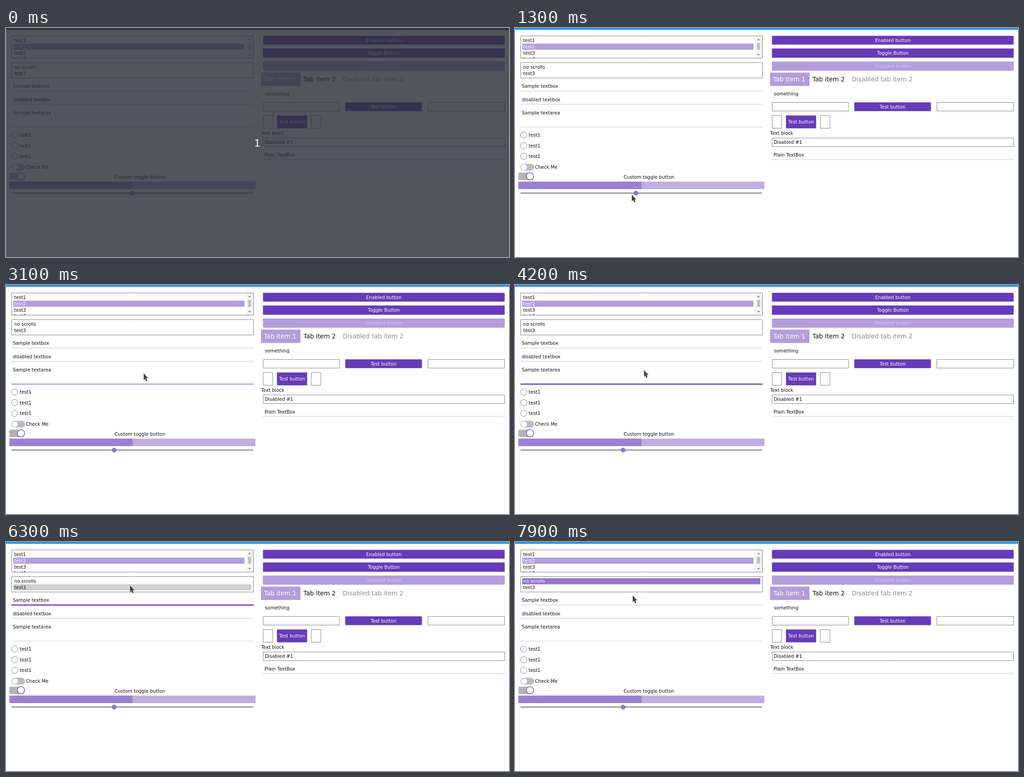
Write an HTML page with a canvas that moves like this. It is 1107x506 px and loops after 8 s.

```html
<!DOCTYPE html>
<html lang="en">
<head>
<meta charset="utf-8">
<title>Control gallery</title>
<style>
  html, body { margin: 0; width: 100%; height: 100%; overflow: hidden; background: #fff; }
  canvas { display: block; }
</style>
</head>
<body>
<canvas id="stage" width="1107" height="506"></canvas>
<script>
const ctx = document.getElementById('stage').getContext('2d');
const LOOP = 8000, STEP = 100;
const DEEP = '#673ab7', MID = '#9575cd', LIGHT = '#b39ddb', PALE = '#e6e4f2';
const GRAY = '#808080', INK = '#111';

// Pointer path: time, x, y
const path = [
  [200, 332, 477], [800, 282, 367], [1000, 282, 367], [1200, 266, 368],
  [1300, 257, 368], [1500, 238, 369], [1800, 238, 376], [2600, 297, 217],
  [2700, 299, 213], [3100, 303, 195], [3300, 303, 194], [3600, 288, 255],
  [3900, 285, 201], [4900, 283, 159], [5400, 281, 126], [5600, 281, 126],
  [6400, 272, 92], [7100, 268, 83], [7300, 268, 83], [7900, 259, 118]
];

function pointerAt(t) {
  if (t <= path[0][0]) return path[0].slice(1);
  const i = path.findIndex(p => p[0] >= t);
  if (i < 0) return path[path.length - 1].slice(1);
  const [t0, x0, y0] = path[i - 1], [t1, x1, y1] = path[i];
  const k = (t - t0) / (t1 - t0);
  return [x0 + (x1 - x0) * k, y0 + (y1 - y0) * k].map(Math.round);
}

function box(x, y, w, h, fill, radius = 0) {
  ctx.fillStyle = fill;
  ctx.beginPath();
  ctx.roundRect(x, y, w, h, radius);
  ctx.fill();
}

function frame(x, y, w, h, stroke = GRAY, radius = 0) {
  ctx.strokeStyle = stroke;
  ctx.lineWidth = 1;
  ctx.beginPath();
  ctx.roundRect(x + 0.5, y + 0.5, w - 1, h - 1, radius);
  ctx.stroke();
}

function circle(x, y, r, fill, stroke, width = 1) {
  ctx.beginPath();
  ctx.arc(x, y, r, 0, Math.PI * 2);
  ctx.fillStyle = fill;
  ctx.fill();
  if (!stroke) return;
  ctx.strokeStyle = stroke;
  ctx.lineWidth = width;
  ctx.stroke();
}

function polygon(points, fill) {
  ctx.fillStyle = fill;
  ctx.beginPath();
  points.forEach(([x, y]) => ctx.lineTo(x, y));
  ctx.fill();
}

function label(text, x, y, color = INK, size = 10.2, align = 'left') {
  ctx.font = `${size}px "DejaVu Sans", sans-serif`;
  ctx.textAlign = align;
  ctx.fillStyle = color;
  ctx.fillText(text, x, y);
}

function button(text, x, y, w, h, radius = 2, enabled = true) {
  box(x, y, w, h, enabled ? DEEP : LIGHT, radius);
  if (radius) frame(x, y, w, h, enabled ? '#8f76c4' : '#b9a8dc', radius);
  label(text, x + w / 2, y + h / 2 + 3.8, enabled ? '#fff' : '#d1c4e9', 10.2, 'center');
}

function field(text, baseline, lineY, hovered, focused) {
  label(text, 15, baseline);
  box(12, lineY, 533, 2.5, focused ? DEEP : hovered ? LIGHT : PALE);
}

function lists(hover, selected) {
  frame(12, 17, 533, 50);
  box(16, 34.5, 509, 13.5, LIGHT);
  ctx.save();
  ctx.beginPath();
  ctx.rect(13, 18, 531, 48.5);
  ctx.clip();
  for (let i = 0; i < 4; i++)
    label('test' + (i + 1), 18, 31.3 + i * 13.6, i === 1 ? '#fff' : INK);
  ctx.restore();
  box(528, 18, 16, 48, '#f5f5f5');
  box(532.5, 33, 7, 15, '#c2c2c2');
  polygon([[533, 27], [536, 23.5], [539, 27]], GRAY);
  polygon([[533, 57.5], [536, 61], [539, 57.5]], GRAY);

  frame(12, 76, 533, 35);
  ['no scrolls', 'test3'].forEach((text, i) => {
    const y = 80 + i * 13.6, chosen = selected && i === 0;
    if (chosen || hover(y, y + 13.5)) box(16, y, 524, 13.5, chosen ? MID : '#d0d0d0');
    label(text, 18, y + 10.3, chosen ? '#fff' : INK);
  });
}

function leftPanel(t) {
  const [, hoverY] = pointerAt(t - STEP);
  const hover = (top, bottom) => t > 1800 && hoverY >= top && hoverY < bottom;
  const areaFocus = t >= 3300 && t < 5600, boxFocus = t >= 5600 && t < 7300;

  lists(hover, t >= 7400);
  field('Sample textbox', 132.3, 138, hover(119, 142), boxFocus);
  field('disabled textbox', 161.6, 167.5, hover(148, 171), false);
  field('Sample textarea', 191, 217.7, hover(177, 221), areaFocus);
  if (areaFocus && (t - 3300) % 1000 < 500) box(98.5, 181.5, 1, 12, '#000');
  if (boxFocus && (t - 5600) % 1000 < 500) box(95, 122.5, 1, 12, '#000');

  for (let i = 0; i < 3; i++) {
    const y = 236.5 + i * 23.5;
    circle(19.2, y, 7, '#fff', hover(y - 8, y + 8) ? MID : GRAY);
    label('test1', 30, y + 3.7);
  }

  box(12, 300, 30, 15, '#bdbdbd', 7.5);
  circle(20, 307.5, 6.3, '#fff');
  label('Check Me', 44, 311);
  box(7.5, 319.5, 34, 16.5, '#b3b3b3', [3, 8, 8, 3]);
  circle(33, 327.6, 8, '#fff', DEEP, 1.2);
  label('Custom toggle button', 239, 332.6);

  box(7.5, 339.5, 541.5, 16.5, '#c0aee0');
  box(7.5, 339.5, 271, 16.5, '#9b80d0');
  box(12, 363, 532, 3.4, '#a9a9a9', 1);
  const dragX = pointerAt(Math.min(t, 1700) - STEP)[0];
  circle(t < 1000 ? 278 : Math.min(278, Math.max(238, dragX)), 364.7, 5.3, MID);
}

function rightPanel() {
  button('Enabled button', 565.5, 17, 532, 20);
  button('Toggle Button', 565.5, 45.3, 532, 20.4, 0);
  button('Disabled button', 565.5, 74, 532, 20.3, 2, false);

  box(561.3, 98.5, 86.7, 29.5, LIGHT);
  label('Tab item 1', 568, 118, '#fff', 13.6);
  label('Tab item 2', 654.6, 118, INK, 13.6);
  label('Disabled tab item 2', 741.3, 118, '#8c8c8c', 13.6);
  label('something', 569.7, 149.3);

  frame(565.5, 164, 169, 20);
  button('Test button', 746.5, 164, 169, 20);
  frame(928, 164, 170, 20);
  frame(565.5, 193, 22, 29);
  button('Test button', 596, 193, 67, 29);
  frame(671.5, 193, 22, 29);

  label('Text block', 561.5, 235.8);
  frame(565.5, 242.5, 532.5, 20);
  label('Disabled #1', 569.5, 256.2);
  label('Plain TextBox', 569, 283.8);
  box(565.5, 289.3, 532.5, 2.5, PALE);
}

function pointer(x, y) {
  const shape = [[0, 0], [0, 14.7], [3, 12.2], [5.2, 17.2], [7.8, 16], [6, 11.4], [9.5, 10.6]];
  polygon(shape.map(([dx, dy]) => [x + dx, y + dy]), '#474747');
}

function render(now) {
  const t = Math.floor(now % LOOP / STEP) * STEP;
  box(0, 0, 1107, 506, '#fff');
  leftPanel(t);
  rightPanel();
  if (t < 200) {
    box(0, 4, 1107, 502, 'rgba(45, 48, 57, 0.82)');
    label('1', 553, 262, '#fff', 22, 'center');
  } else {
    pointer(...pointerAt(t));
  }
  box(0, 0, 1107, 4, t < 1000 ? '#2f303a' : '#2196f3');
}

const start = performance.now();
function tick() {
  render(performance.now() - start);
  requestAnimationFrame(tick);
}
tick();
</script>
</body>
</html>
```
